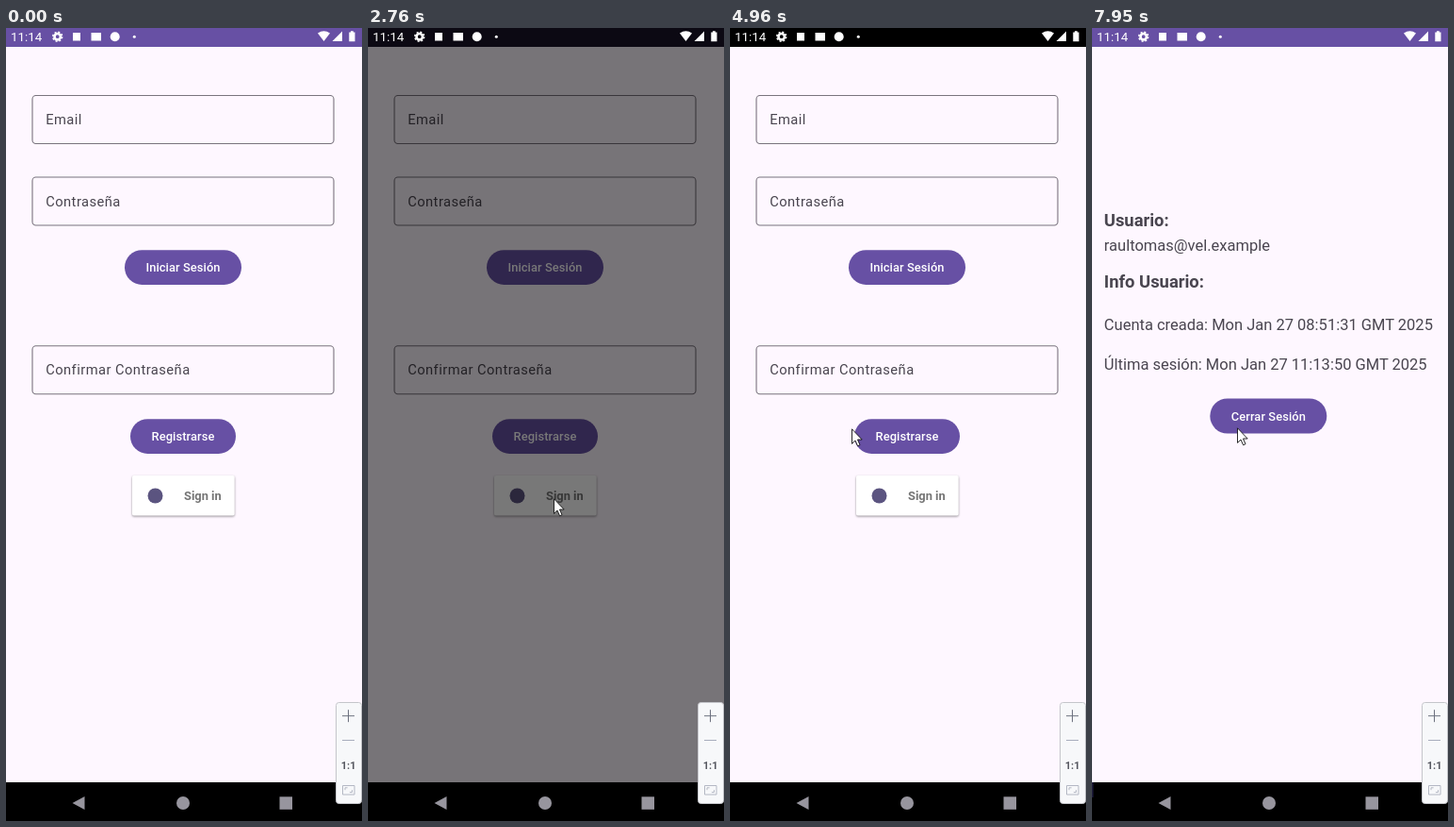
Animation, 378 px wide and 840 px high, one loop 8 s. Source, as an HTML page:

```html
<!DOCTYPE html>
<html lang="es">
<head>
<meta charset="utf-8">
<title>Inicio de sesión</title>
<style>
  html, body { margin: 0; width: 100%; height: 100%; overflow: hidden; background: #fef7ff; }
  svg { display: block; width: 100vw; height: 100vh; }
  text { font-family: Roboto, sans-serif; white-space: pre; }

  .label { font-size: 14.7px; letter-spacing: .46px; fill: #49454f; }
  .field { fill: none; stroke: #79747e; stroke-width: 1.1; }
  .btn rect { fill: #6750a4; }
  .btn text { font-size: 12.86px; font-weight: 500; letter-spacing: .09px; fill: #fff; text-anchor: middle; }
  .signin rect { fill: #fff; filter: drop-shadow(0 1px 1px rgba(0, 0, 0, .42)); }
  .signin text { font-size: 12.86px; font-weight: 700; fill: #757575; }
  .head { font-size: 18.4px; font-weight: 700; fill: #49454f; }
  .info { font-size: 16.5px; fill: #49454f; }
  .toast rect { fill: #f0eef1; }
  .toast text { font-size: 12.86px; fill: #1d1b20; }

  .dialog .title { font: 400 21px Inter, sans-serif; fill: #202124; text-anchor: middle; }
  .dialog .sub { font-size: 14.7px; fill: #202124; text-anchor: middle; }
  .dialog .name { font: 500 12.3px Inter, sans-serif; fill: #3c4043; }
  .dialog .add { font: 500 12.86px Inter, sans-serif; letter-spacing: .2px; fill: #3c4043; }
  .dialog .mail { font-size: 11px; letter-spacing: .12px; fill: #5f6368; }
  .dialog .note { font-size: 12.86px; letter-spacing: .03px; fill: #5f6368; }
  .rule { stroke: #dadce0; stroke-width: 1.1; }
  .line { fill: none; stroke: #5f6368; stroke-width: 1.5; }

  .anim { animation: 8s linear infinite both; }
  .bar { animation-name: bar; }
  .dim { animation-name: dim; }
  .dialog { animation-name: dialog; }
  .page { animation-name: page; }
  .slide { animation-name: slide; }
  .toast { animation-name: toast; }
  .cursor { animation-name: cursor; }
  .tap1 { animation-name: tap1; }
  .tap2 { animation-name: tap2; }

  @keyframes bar {
    0%, 30.1% { fill: #6750a4; }
    35.1%, 62.7% { fill: #000; }
    65.25%, 100% { fill: #6750a4; }
  }
  @keyframes dim {
    0%, 30.1% { opacity: 0; }
    35.1%, 61.99% { opacity: .6; }
    62%, 100% { opacity: 0; }
  }
  @keyframes dialog {
    0%, 38.86% { opacity: 0; transform: translateY(22px); }
    38.87%, 39.6% { opacity: 1; transform: translateY(22px); animation-timing-function: ease-out; }
    42.3%, 58.3% { opacity: 1; transform: none; }
    60.25%, 100% { opacity: 0; transform: none; }
  }
  @keyframes page {
    0%, 69.2% { opacity: 0; }
    71.2%, 100% { opacity: 1; }
  }
  @keyframes slide {
    0%, 69.2% { transform: translateX(38px); animation-timing-function: cubic-bezier(.05, .7, .1, 1); }
    73.7%, 100% { transform: none; }
  }
  @keyframes toast {
    0%, 71.3% { opacity: 0; }
    73.7%, 93.8% { opacity: 1; }
    96.5%, 100% { opacity: 0; }
  }
  @keyframes cursor {
    0%, 9.74% { opacity: 0; transform: translate(300px, 832px); }
    9.75% { opacity: 1; transform: translate(300px, 832px); }
    13% { transform: translate(240px, 700px); }
    16.5% { transform: translate(172px, 575px); }
    18% { transform: translate(157px, 535px); }
    19.25%, 19.8% { transform: translate(169px, 515px); animation-timing-function: ease-out; }
    22.75%, 45.8% { transform: translate(197px, 498px); animation-timing-function: ease-in-out; }
    52.7%, 95% { transform: translate(129px, 424px); animation-timing-function: ease-in-out; }
    99.3%, 100% { opacity: 1; transform: translate(154px, 423px); }
  }
  @keyframes tap1 {
    0%, 28.49% { opacity: 0; }
    28.5%, 30.6% { opacity: .8; }
    32%, 100% { opacity: 0; }
  }
  @keyframes tap2 {
    0%, 57.74% { opacity: 0; }
    57.75%, 59.2% { opacity: .8; }
    60.25%, 100% { opacity: 0; }
  }
</style>
</head>
<body>
<svg viewBox="0 0 378 840" preserveAspectRatio="none">
  <rect width="378" height="840" fill="#fef7ff"/>

  <!-- login form -->
  <g class="field">
    <rect x="28" y="71.5" width="320" height="51" rx="3.7"/>
    <rect x="28" y="158" width="320" height="51" rx="3.7"/>
    <rect x="28" y="336.8" width="320" height="51" rx="3.7"/>
  </g>
  <g class="label">
    <text x="42.2" y="102.2">Email</text>
    <text x="42.2" y="188.5">Contraseña</text>
    <text x="42.2" y="367.4">Confirmar Contraseña</text>
  </g>
  <g class="btn">
    <rect x="126" y="235.2" width="124" height="36.8" rx="18.4"/>
    <text x="188" y="258.4">Iniciar Sesión</text>
    <rect x="132" y="414.2" width="112" height="36.8" rx="18.4"/>
    <text x="188" y="437.4">Registrarse</text>
  </g>
  <g class="signin">
    <rect x="134" y="474" width="108.7" height="42.5" rx="1.8"/>
    <circle cx="158.5" cy="495.5" r="8" fill="#5b5480"/>
    <text x="189" y="500.4">Sign in</text>
  </g>

  <rect class="anim dim" y="20" width="378" height="779"/>

  <!-- navigation bar -->
  <rect y="799" width="378" height="41"/>
  <g fill="#97959e">
    <path d="M70.5 821 83.5 814V828Z"/>
    <circle cx="188" cy="821" r="7"/>
    <rect x="290.5" y="814.3" width="13.5" height="13.5"/>
  </g>

  <!-- account page -->
  <g class="anim page">
    <rect y="19" width="378" height="780" fill="#fef7ff"/>
    <rect y="799" width="1.5" height="16" fill="#1b1838"/>
    <g class="anim slide">
      <text class="head" x="12.8" y="210.3">Usuario:</text>
      <text class="info" x="12.8" y="236.2">raultomas@vel.example</text>
      <text class="head" x="12.8" y="275.4">Info Usuario:</text>
      <text class="info" x="12.8" y="320">Cuenta creada: Mon Jan 27 08:51:31 GMT 2025</text>
      <text class="info" x="12.8" y="362">Última sesión: Mon Jan 27 11:13:50 GMT 2025</text>
      <g class="btn">
        <rect x="125.3" y="392.4" width="124" height="37.2" rx="18.6"/>
        <text x="187.4" y="416">Cerrar Sesión</text>
      </g>
    </g>
  </g>
  <g class="anim toast">
    <rect x="40" y="716" width="296" height="60.5" rx="22"/>
    <text x="62.3" y="744.2">Bienvenido con Velquo:</text>
    <text x="62.3" y="759.2">raultomas@vel.example</text>
  </g>

  <!-- account chooser -->
  <g class="anim dialog">
    <rect x="23" y="229" width="330" height="361" rx="7" fill="#fff"/>
    <circle cx="188" cy="273" r="22" fill="#3ddc84"/>
    <text class="title" x="188" y="333.5">Choose an account</text>
    <text class="sub" x="188" y="365.6">to continue to Autorizador Prueba</text>
    <circle cx="53" cy="423" r="14" fill="#f4511e"/>
    <text x="53" y="428.2" font-size="14.5" fill="#fff" text-anchor="middle">R</text>
    <text class="name" x="78.2" y="420">Raul Tomas Verdejal</text>
    <text class="mail" x="78.2" y="437.4">raultomas@vel.example</text>
    <path class="rule" d="M39 454.6H337M45 500.4H331"/>
    <circle class="line" cx="50.5" cy="473.8" r="2.6"/>
    <path class="line" d="M44.9 482.6v-1.3q0-2.9 5.6-2.9t5.6 2.9v1.3zM56.5 475.5h5.6M59.3 472.7v5.6"/>
    <text class="add" x="78.2" y="481.4">Add another account</text>
    <g class="note">
      <text x="45" y="530">To continue, Velquo will share your name, email</text>
      <text x="45" y="547">address, and profile picture with Autorizador</text>
      <text x="45" y="564">Prueba.</text>
    </g>
  </g>

  <!-- status bar -->
  <rect class="anim bar" width="378" height="20"/>
  <g fill="#fff">
    <text x="5" y="14.2" font-size="13.3">11:14</text>
    <g fill="none" stroke="#fff">
      <circle cx="54.7" cy="9.2" r="3.2" stroke-width="2.6"/>
      <circle cx="54.7" cy="9.2" r="4.9" stroke-width="1.6" stroke-dasharray="2 1.85"/>
    </g>
    <rect x="71" y="5" width="8" height="8.5"/>
    <rect x="90.5" y="5" width="10.5" height="8.5"/>
    <circle cx="115.7" cy="9.2" r="5"/>
    <circle cx="136.3" cy="9.2" r="1.5"/>
    <path d="M331 5.6Q337.5 1 344 5.6L337.5 14Z"/>
    <path d="M357 3.5V14H346.5Z"/>
    <path d="M364.3 4.5h1.7v-1.3h2.8v1.3h1.7v9.7h-6.2z"/>
  </g>

  <!-- zoom panel -->
  <rect x="350.5" y="714.5" width="27" height="107" rx="3" fill="#f7f8fa" stroke="#c4c5ca"/>
  <path d="M357 728.7h13M363.5 722.2v13" stroke="#6c707e" fill="none"/>
  <path d="M357 754.5h13" stroke="#a8adbd"/>
  <text x="363.6" y="784.8" font-size="11" font-weight="700" fill="#55575f" text-anchor="middle">1:1</text>
  <path d="M357.5 802.5h12.5v9.5h-12.5zM360 807.2v-2.4h2.6M367.5 807.2v2.4h-2.6" fill="none" stroke="#b4b8c4"/>

  <!-- pointer -->
  <circle class="anim tap1" cx="197" cy="498" r="12" fill="#fcf04d"/>
  <circle class="anim tap2" cx="129" cy="424" r="12" fill="#fcf04d"/>
  <g class="anim cursor">
    <path d="M.5 .8V16.4L4 13 6.6 18.8 9 17.7 6.5 12H11.2Z" fill="#fff" stroke="#111" stroke-width=".9"/>
  </g>
</svg>
</body>
</html>
```
